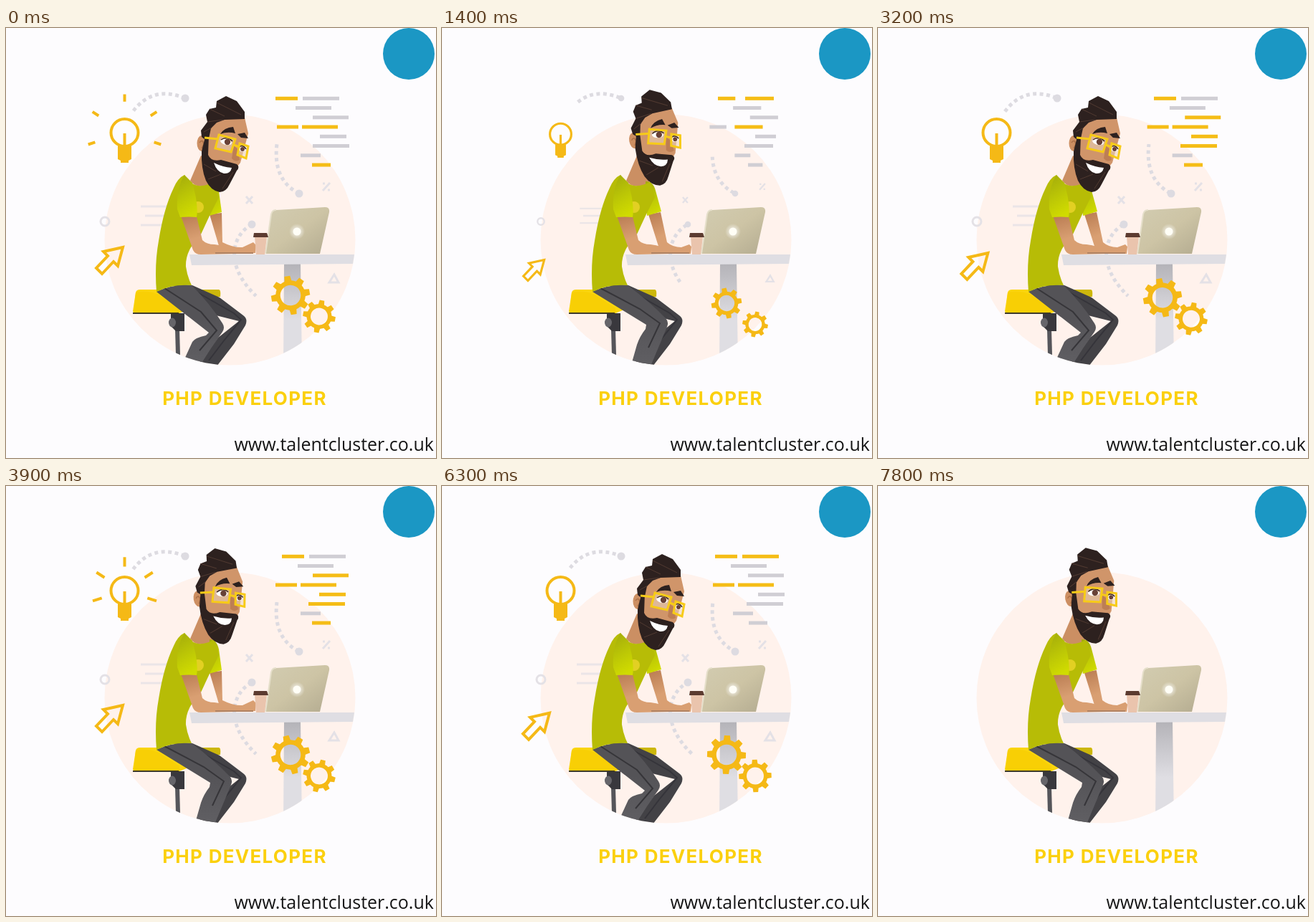
Write an HTML page that moves like this. It is 600x600 px and loops after 8 s.

```html
<!DOCTYPE html>
<html lang="en">
<head>
<meta charset="utf-8">
<title>PHP developer</title>
<style>
  html, body { margin: 0; width: 100%; height: 100%; overflow: hidden; background: #fdfcfe; }
  svg { display: block; width: 100vw; height: 100vh; }
  .title { font: 700 26px Inter, "Open Sans", sans-serif; letter-spacing: 1.3px; fill: #fbd00e; }
  .url { font: 25px "Open Sans", "Noto Sans", sans-serif; fill: #161616; }
  .icon { fill: none; stroke: #f5b916; stroke-width: 4; }
  .faint { fill: none; stroke: #e4e1e6; stroke-width: 3; }
  .trail { fill: none; stroke: #dddbe1; stroke-width: 5; stroke-dasharray: 5 4.5; }
  .specs { fill: none; stroke: #f7cb18; stroke-width: 3; }
</style>
</head>
<body>
<svg viewBox="0 0 600 600">
  <defs>
    <clipPath id="disc"><circle cx="312.5" cy="295.5" r="175"/></clipPath>
    <clipPath id="codeBox"><rect x="369" y="88" width="118" height="112"/></clipPath>
    <linearGradient id="lid" x2="1" y2="1"><stop stop-color="#d2ccb1"/><stop offset=".5" stop-color="#cdc4a5"/><stop offset="1" stop-color="#b3ab90"/></linearGradient>
    <linearGradient id="post" x2="0" y2="1"><stop stop-color="#b4b3b8"/><stop offset=".55" stop-color="#dfdee3"/></linearGradient>
    <linearGradient id="sleeve" x1=".2" x2=".5" y2="1"><stop stop-color="#a5ad0b"/><stop offset=".6" stop-color="#bfca05"/><stop offset="1" stop-color="#d0db00"/></linearGradient>
    <linearGradient id="skin" x2=".4" y2="1"><stop stop-color="#b97c52"/><stop offset=".6" stop-color="#d99f72"/></linearGradient>
    <linearGradient id="shin" x2="0" y2="1"><stop offset=".4" stop-color="#545357"/><stop offset="1" stop-color="#605f63"/></linearGradient>
    <radialGradient id="glow"><stop offset=".4" stop-color="#fff"/><stop offset="1" stop-color="#fff" stop-opacity="0"/></radialGradient>
  </defs>

  <rect width="600" height="600" fill="#fdfcfe"/>
  <circle cx="312.5" cy="295.5" r="175" fill="#fff2ec"/>
  <circle cx="562" cy="36" r="36" fill="#1b97c4"/>

  <g id="faint"></g>
  <g id="trails"></g>

  <g clip-path="url(#disc)">
    <path d="M388 329H411L413 470H387Z" fill="url(#post)"/>
    <path d="M236 420H242L243 456H237Z" fill="#55555a"/>
  </g>
  <path d="M230 398H249V423H237L230 416Z" fill="#39383d"/>
  <ellipse cx="232" cy="411" rx="5" ry="6.5" fill="#66656a"/>
  <path d="M177 395L181 369Q182 365 187 365H296Q300 365 299 371L296 376L242 398H178Z" fill="#fad50c"/>
  <path d="M181 369Q195 365 213 372L242 391V398H178Z" fill="#f8cf05"/>
  <path d="M272 365H297Q300 366 299 375H284Z" fill="#ccb70b"/>
  <path d="M177 398H241" stroke="#3e3a28" stroke-width="2"/>

  <g clip-path="url(#disc)">
    <path d="M235 357L260 359L298 376L331 401Q338 406 334 415L318 441L294 472H266L296 432L325 409L285 399L240 372Z" fill="#434246"/>
    <path d="M262 366L318 398L328 407L305 435L283 464" fill="none" stroke="#35343a" stroke-width="2"/>
    <path id="leg" fill="url(#shin)"/>
    <path id="crease" fill="none" stroke="#363539" stroke-width="2"/>
  </g>

  <path id="farArm" fill="url(#skin)"/>
  <path d="M256 316H486L484 329L259 331Z" fill="#dfdee3"/>
  <path d="M362 315L370 260Q371 254 377 254L445 250Q452 250 451 257L438 315Z" fill="url(#lid)"/>
  <path d="M362 315L370 260Q371 254 377 254" fill="none" stroke="#e5dfca" stroke-width="2"/>
  <circle cx="406" cy="284" r="11" fill="url(#glow)" opacity=".55"/>
  <circle cx="406" cy="284" r="5.5" fill="#fffef6"/>
  <path d="M347 291H364L361 316H349Z" fill="#eac4ad"/>
  <path d="M346 286H364L366 292H345Z" fill="#5c3b30"/>

  <path d="M272 178L257 213Q266 226 288 217L299 196Z" fill="#cb8f63"/>
  <path id="farSleeve" fill="url(#sleeve)"/>
  <path d="M249 205Q256 218 268 220Q280 221 291 214L297 236L284 262L271 290Q250 310 251 333Q253 347 259 359Q232 357 210 368Q207 330 213 297Q220 252 234 223Q240 209 249 205Z" fill="#b7bc06"/>
  <circle cx="268" cy="250" r="8" fill="#e2d023"/>
  <path d="M244 262L266 263L274 296Q280 302 291 302Q307 304 319 311V315L272 316Q264 316 261 310Z" fill="url(#skin)"/>
  <path d="M249 205Q237 224 239 253L243 264Q256 263 266 264Q269 247 260 216Z" fill="url(#sleeve)"/>
  <path d="M292 314H345" stroke="#af8262" stroke-width="2"/>

  <g id="head">
    <path d="M281 140L300 124L333 125L338 147L333 166L327 188L314 204L286 194L277 165Z" fill="#d0956a"/>
    <path d="M318 164L324 170L326 184Q320 188 315 182Z" fill="#bd7e54"/>
    <ellipse cx="273" cy="161" rx="6.5" ry="11" fill="#cd8f62"/>
    <path d="M270 160Q274 154 276 162L273 168" fill="none" stroke="#ac7048" stroke-width="1.5"/>
    <path d="M273 152L272 143L281 131L279 121L284 113L293 111L294 102L307 95L322 102L333 117V127L305 128L294 132L286 140L283 154L278 156Z" fill="#2d211f"/>
    <path d="M273 172L278 152L283 150L282 177Q286 187 300 184L322 190Q327 194 322 199L312 218Q307 229 298 229Q286 227 279 213Q272 196 273 172Z" fill="#2d211f"/>
    <path d="M281 131L303 128M284 113L305 123M294 104L328 121M276 145L287 139M276 190L293 200M282 211L300 204M302 224L317 201" fill="none" stroke="#513a31" stroke-width="1"/>
    <path d="M290 188Q302 194 315 195Q313 204 304 203Q294 201 290 188Z" fill="#fff"/>
    <path d="M299 148Q304 139 317 138L320 147Q309 144 299 148ZM323 148L333 146L338 154L328 153Z" fill="#2d211f"/>
    <path d="M297 149L320 155L314 173L292 168ZM326 161L338 165L335 182L323 177Z" fill="#ecd5bd" opacity=".55"/>
    <ellipse cx="307" cy="159" rx="8" ry="4" fill="#fff" transform="rotate(12 307 159)"/>
    <circle cx="309" cy="159" r="4.2" fill="#684137"/>
    <ellipse cx="330" cy="169" rx="5" ry="3.5" fill="#fff"/>
    <circle cx="330" cy="169" r="3" fill="#684137"/>
    <path d="M300 156Q309 150 316 158M324 167Q330 161 335 169" fill="none" stroke="#3b2924" stroke-width="1.5"/>
    <path class="specs" d="M297 149L320 155L314 173L292 168ZM326 161L338 165L335 182L323 177ZM277 153L296 155M318 163L325 166"/>
  </g>

  <g id="bulb">
    <circle class="icon" cx="165.5" cy="146" r="19"/>
    <path class="icon" d="M165.5 147V168"/>
    <path d="M156 164H175V183L171 185V188H160V185L156 183Z" fill="#f5b916"/>
  </g>
  <path id="rays" class="icon" stroke-width="5"/>
  <path id="arrow" class="icon" d="M163 306L136 312L142 318L126 335L134 343L150 326L156 332Z"/>
  <g id="gearA"></g>
  <g id="gearB"></g>
  <g id="code" clip-path="url(#codeBox)"></g>

  <text class="title" x="333" y="526" text-anchor="middle">PHP DEVELOPER</text>
  <text class="url" x="597" y="590" text-anchor="end">www.talentcluster.co.uk</text>
</svg>

<script>
const LOOP = 8000, CYCLE = 6000, STEP = 100;
const $ = id => document.getElementById(id);

function add(parent, tag, attrs) {
  const el = document.createElementNS('http://www.w3.org/2000/svg', tag);
  set(el, attrs);
  return parent.appendChild(el);
}
function set(el, attrs) {
  for (const k in attrs) el.setAttribute(k, attrs[k]);
}
function ease(t, from, to) {
  const k = Math.min(1, Math.max(0, (t - from) / (to - from)));
  return k * k * (3 - 2 * k);
}
function key(points, t) {
  let i = 0;
  while (i < points.length - 2 && t >= points[i + 1][0]) i++;
  const [t0, a] = points[i], [t1, b] = points[i + 1];
  return a + (b - a) * ease(t, t0, t1);
}
// Blend two paths that have the same commands.
function mix(a, b, k) {
  const ends = b.match(/-?[\d.]+/g);
  let i = 0;
  return a.replace(/-?[\d.]+/g, n => +n + (ends[i++] - n) * k);
}
function pop(el, cx, cy, k, move = '') {
  el.setAttribute('transform', `${move} translate(${cx} ${cy}) scale(${k}) translate(${-cx} ${-cy})`);
}

// Faint ornaments: shape and centre
const ornaments = [
  ['M144 270A6 6 0 1 1 132 270A6 6 0 1 1 144 270', 138, 270],
  ['M335 235L344 245M344 235L335 245', 339, 240],
  ['M442 227L452 216M442 217H445M449 226H452', 447, 221],
  ['M458 344L464 355H451Z', 458, 350],
  ['M188 249H229M194 262H229M188 275H229', 208, 262]
].map(([d, x, y], i) => ({
  x, y, el: add($('faint'), 'path', { d, class: 'faint', ...(i == 4 && { 'stroke-width': 4, opacity: .75 }) })
}));

const trails = [
  ['M250 98Q204 79 176 118', 250, 98],
  ['M409 231Q372 212 378 162', 409, 231],
  ['M343 274C314 290 305 332 349 374', 343, 274]
].map(([d, x, y], i) => {
  const box = $('trails');
  const mask = add(box, 'mask', { id: 'wipe' + i, maskUnits: 'userSpaceOnUse', x: 0, y: 0, width: 600, height: 600 });
  const wipe = add(mask, 'path', { d, fill: 'none', stroke: '#fff', 'stroke-width': 9, pathLength: 1, 'stroke-dasharray': '1 2' });
  const line = add(box, 'path', { d, class: 'trail', mask: `url(#wipe${i})` });
  const dot = add(box, 'circle', { cx: x, cy: y, fill: '#dddbe1' });
  return { wipe, line, dot };
});

for (const id of ['gearA', 'gearB']) {
  add($(id), 'circle', { r: 17.5, class: 'icon', style: 'stroke-width:6.5' });
  for (let i = 0; i < 8; i++)
    add($(id), 'path', { d: 'M-5 -19L-4 -27H4L5 -19Z', fill: '#f5b916', transform: `rotate(${i * 45})` });
}

// Code rows: bar widths, width left while retyping, x at each key time
const codeTimes = [0, 300, 700, 3900, 5000, 6000];
const codeColors = ['ygggyygggy', 'yyggyygggg', 'yygggygggg', 'yggyyyyygy', 'ygyyggyyyy'];
const rows = [
  [[31, 51], 1, 376, 381, 385, 385, 361],
  [[50], .92, 404, 403, 406, 407, 416],
  [[50], 1, 428, 427, 430, 428, 436],
  [[30, 50], 1, 378, 378, 373, 376, 363],
  [[37], .68, 438, 441, 437, 437, 428],
  [[51], 1, 428, 425, 422, 422, 436],
  [[28], .25, 411, 406, 408, 411, 436],
  [[26], .92, 427, 428, 427, 427, 419]
].map(([widths, typed, ...xs], i) => ({
  widths, typed,
  path: codeTimes.map((t, j) => [t, xs[j % 5]]),
  bars: widths.map(() => add($('code'), 'rect', { y: 95.8 + i * 13.25, height: 5 }))
}));

const LEG_OUT = 'M210 368Q232 357 259 359Q285 385 302 412Q306 418 302 424L286 447L270 472L248 464L260 438Q264 432 279 429L283 425Z';
const LEG_IN = 'M210 368Q232 357 259 359Q290 382 312 405Q317 410 314 417L304 441L291 472L264 470L272 442Q276 430 284 420L285 414Z';
const CREASE_OUT = 'M221 363L272 396L294 422L270 450';
const CREASE_IN = 'M221 363L276 392L304 412L288 446';
const ARM_UP = 'M284 260L301 258L302 299Q318 307 330 306L345 299L349 303L348 314L300 314Z';
const ARM_DOWN = 'M288 260L305 257L314 299Q322 306 334 306L345 302L348 305L347 315L305 314Z';
const SLEEVE_UP = 'M284 214Q294 214 297 228L301 257L283 262Z';
const SLEEVE_DOWN = 'M284 214Q295 214 298 227L306 256L286 262Z';

const arrowShift = [[0, 0], [300, 13], [450, 18], [700, 9], [900, 0], [1000, 0]];
const gearDrop = [[0, 2], [300, 4], [700, 7], [1400, 13], [1800, 13], [2700, 6], [3900, 4], [5000, 0], [6000, 2]];
const gearTilt = [[0, -10], [300, 2], [700, 0], [1700, 45], [3900, 31], [5000, 31], [6000, 35]];

function drawCode(c, shown) {
  const state = codeColors[[150, 500, 2000, 4450, 5500, 6001].findIndex(t => c < t) % 5];
  const retype = key([[0, 0], [4600, 0], [5000, 1], [5400, 0], [6000, 0]], c);
  let n = 0;
  for (const row of rows) {
    let x = key(row.path, c);
    row.bars.forEach((bar, i) => {
      const w = row.widths[i] * shown * (1 - retype * (1 - row.typed));
      set(bar, { x, width: w, fill: state[n++] == 'y' ? '#f5bd16' : '#d0ced4' });
      x += row.widths[i] + (row.widths.length > 1 && row.widths[0] > 30 ? 7 : 5);
    });
  }
}

function drawRays(t) {
  const p = ((t + 250) % 2000) / 350;
  const c = t % CYCLE;
  if (p >= 1 || c > 1250 && c < 3200) return $('rays').setAttribute('d', '');
  const near = 24 + 24 * ease(p, 0, 1), len = p < .45 ? 14 * p / .45 : 14 - 8 * (p - .45) / .55;
  const d = [-162, -150 + 120 * .0, -90, -32, 18].map((deg, i) => {
    const a = [-198, -147, -90, -33, 18][i] * Math.PI / 180;
    const at = r => `${165.5 + r * Math.cos(a)} ${146 + r * Math.sin(a)}`;
    return `M${at(near)}L${at(near + len)}`;
  });
  $('rays').setAttribute('d', d.join(''));
}

function draw(t) {
  const c = t % CYCLE, half = t % 3000;
  const gone = ease(c, 1250, 1750);
  const shown = c < 2000 ? 1 - gone : ease(c, 2700, 3150);
  const drawn = c < 2000 ? 1 - gone : ease(c, 2400, 2750);
  const dots = c < 2000 ? 1 - gone : ease(c, 2150, 2400);

  for (const o of ornaments) pop(o.el, o.x, o.y, shown);
  for (const { wipe, line, dot } of trails) {
    wipe.setAttribute('stroke-dashoffset', 1 - drawn);
    line.setAttribute('visibility', drawn > 0 ? 'visible' : 'hidden');
    line.setAttribute('stroke-dashoffset', 2 * Math.sin(t / 1000 * Math.PI));
    dot.setAttribute('r', 5.5 * dots);
  }

  const up = ease(half, 730, 940) - ease(half, 2050, 2350);
  $('head').setAttribute('transform', `translate(${6 * up} ${-9 * up}) rotate(${-10 * up} 297 228)`);

  const tucked = ease(half, 380, 650) - ease(half, 2080, 2350);
  $('leg').setAttribute('d', mix(LEG_OUT, LEG_IN, tucked));
  $('crease').setAttribute('d', mix(CREASE_OUT, CREASE_IN, tucked));

  const beat = t % 2000;
  const press = ease(beat, 50, 250) - ease(beat, 1780, 1900);
  $('farArm').setAttribute('d', mix(ARM_UP, ARM_DOWN, press));
  $('farSleeve').setAttribute('d', mix(SLEEVE_UP, SLEEVE_DOWN, press));

  pop($('bulb'), 165.5, 156, shown);
  drawRays(t);
  const shift = key(arrowShift, t % 1000);
  pop($('arrow'), 146, 323, shown, `translate(${-shift} ${shift * .83})`);

  const drop = key(gearDrop, c), tilt = key(gearTilt, c);
  $('gearA').setAttribute('transform', `translate(397 ${371 + drop}) rotate(${tilt}) scale(${shown})`);
  $('gearB').setAttribute('transform', `translate(437 ${400.5 + drop}) rotate(${-tilt}) scale(${shown * .84})`);
  drawCode(c, shown);
}

const start = performance.now();
function tick() {
  const t = (performance.now() - start) % LOOP;
  draw(Math.min(7800, Math.floor(t / STEP) * STEP));
  requestAnimationFrame(tick);
}
tick();
</script>
</body>
</html>
```
